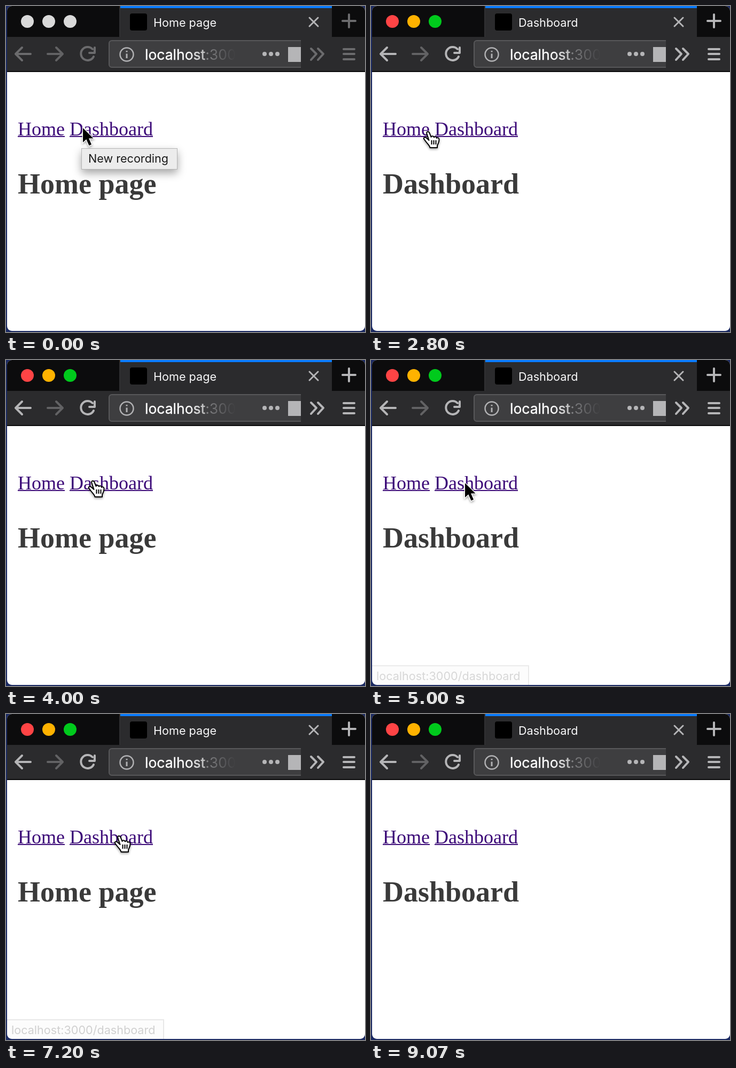
These frames come from a looping animation (672 by 612 pixels, 9140 ms). An HTML page:

```html
<!DOCTYPE html>
<html lang="en">
<head>
<meta charset="utf-8">
<title>Browser navigation</title>
<style>
  html, body { margin: 0; width: 100%; height: 100%; overflow: hidden; background: #1b2a63; }
  svg { display: block; width: 672px; height: 612px; }
  .ui { font-family: Inter, "Liberation Sans", sans-serif; font-size: 21.6px; }
  .page { font-family: "Liberation Serif", "Times New Roman", serif; }
  .line { fill: none; stroke-width: 4; stroke-linecap: round; stroke-linejoin: round; }
  .live { stroke: #b5b5b7; }
  .inactive .live { stroke: #6b6b6d; }
  .inactive .light { fill: #d9d9d9; stroke: none; }
</style>
</head>
<body>
<svg viewBox="0 0 672 612">
  <defs>
    <clipPath id="frame"><rect x="2" width="670" height="610" rx="9"/></clipPath>
    <clipPath id="bar"><rect x="190" y="60" width="362" height="60"/></clipPath>
    <linearGradient id="fade" gradientUnits="userSpaceOnUse" x1="340" x2="430">
      <stop stop-color="#fff"/><stop offset="1" stop-color="#fff" stop-opacity="0"/>
    </linearGradient>
    <mask id="urlMask"><rect x="250" y="64" width="190" height="52" fill="url(#fade)"/></mask>
    <filter id="shadow" x="-50%" y="-50%" width="200%" height="200%">
      <feDropShadow dx="0" dy="2" stdDeviation="2" flood-opacity=".4"/>
    </filter>
    <filter id="tipShadow" x="-30%" y="-50%" width="160%" height="260%">
      <feDropShadow dx="0" dy="7" stdDeviation="8" flood-opacity=".35"/>
    </filter>
  </defs>

  <rect width="672" height="612" fill="#1b2a63"/>
  <g id="win" class="ui" clip-path="url(#frame)">
    <rect width="672" height="612" fill="#fff"/>
    <rect width="672" height="124" fill="#0c0c0d"/>
    <rect x="212" width="2" height="58" fill="#303032"/>
    <path d="M214 0H610V58H672V122H0V58H214Z" fill="#2b2b2d"/>
    <rect x="214" width="396" height="4" fill="#0a7cff"/>

    <circle class="light" cx="40" cy="29" r="12" fill="#ff4445"/>
    <circle class="light" cx="80" cy="29" r="12" fill="#ffb200"/>
    <circle class="light" cx="120" cy="29" r="12" fill="#00ca1c"/>
    <rect x="232" y="14" width="32" height="32" rx="4" fill="#000"/>
    <text id="tab" x="276" y="39" fill="#f9f9fa"></text>

    <g class="line">
      <path d="M568 22L584 38M584 22L568 38" stroke="#b5b5b7" stroke-width="3"/>
      <path class="live" d="M630 28H654M642 16V40"/>
      <path class="live" d="M46 90H18M30 78L18 90L30 102"/>
      <path d="M78 90H106M94 78L106 90L94 102" stroke="#626264"/>
      <path class="live" d="M162 81A12.5 12.5 0 1 0 164 95M166 78V88H156"/>
      <path class="live" d="M571 80L581 90L571 101M584 80L594 90L584 101"/>
      <path class="live" d="M632 81H652M632 90H652M632 100H652"/>
    </g>

    <g clip-path="url(#bar)">
      <rect x="193" y="65" width="380" height="50" rx="5" fill="#3e3e40" stroke="#58585a" stroke-width="2"/>
      <rect x="528" y="77" width="28" height="28" fill="#b5b5b7"/>
    </g>
    <circle cx="226" cy="91" r="12.5" fill="none" stroke="#b1b1b3" stroke-width="2.5"/>
    <path d="M226 84V86.5M226 89.5V98" stroke="#b1b1b3" stroke-width="3"/>
    <text x="260" y="101" font-size="26.5" mask="url(#urlMask)" fill="#b1b1b3"><tspan fill="#fff" stroke="#fff" stroke-width=".4">localhost</tspan>:3000</text>
    <g fill="#b5b5b7">
      <circle cx="484" cy="90" r="4"/><circle cx="496" cy="90" r="4"/><circle cx="508" cy="90" r="4"/>
    </g>

    <g class="page">
      <g font-size="36" fill="#3c0a78">
        <text x="22" y="243">Home</text><text x="119" y="243">Dashboard</text>
        <path d="M22 245H110M119 245H275" stroke="#3c0a78" stroke-width="2"/>
      </g>
      <text id="heading" x="22" y="352" font-size="54" font-weight="700" fill="#3a3a3a"></text>
    </g>

    <g id="status">
      <path id="panel" fill="#f5f5f5" stroke="#bbb" stroke-width="2"/>
      <text id="address" x="10" y="601" fill="#777"></text>
    </g>
  </g>

  <g id="tip" class="ui">
    <rect x="141.5" y="267.5" width="179" height="39" fill="#ececec" stroke="#b4b4b4" filter="url(#tipShadow)"/>
    <text x="154" y="294" fill="#1a1a1a">New recording</text>
  </g>

  <g id="cursor" filter="url(#shadow)">
    <path id="arrow" d="M0 0V27L6.3 21.3L11.5 33L16 31L11 19.6H19.5Z" fill="#000" stroke="#fff" stroke-width="2.5" paint-order="stroke"/>
    <g id="hand" transform="translate(-8 -1)" stroke="#000" stroke-width="2" stroke-linejoin="round">
      <path fill="#fff" d="M11.5 18L7.5 6C6 1.5 11 .5 12.5 4.5L15.5 12C16 9.5 20 9.5 21 12.5C22 10.5 25.5 11 26 14C27 12.5 30.5 13 30.5 16.5C30.8 22 28 25 27 28V32H13.5C13 28 9 25 6.5 21.5L2 15.5C1 12.5 4.5 11.5 6.5 13.5Z"/>
      <path fill="none" d="M16.5 18V26M20.5 18V26M24.5 18V26"/>
    </g>
  </g>
</svg>

<script>
const LOOP = 9140, ACTIVE_AT = 1100;
const $ = id => document.getElementById(id);
const clamp = v => Math.max(0, Math.min(1, v));
const show = (id, on) => $(id).style.display = on ? "" : "none";

// Pointer stops: time, x, y
const stops = [
  [0, 144, 229], [900, 144, 229], [1400, 168, 231], [2450, 168, 231],
  [2800, 105, 235], [3000, 80, 231], [3650, 80, 231],
  [4000, 161, 226], [4200, 176, 231], [5250, 176, 231],
  [5650, 78, 230], [6600, 78, 230], [7050, 210, 228],
  [8300, 210, 228], [8900, 330, 640]
];

// Link visits: status shown from, click time, destination
const visits = [
  [1550, 2200, "Dashboard"], [3050, 3450, "Home page"], [4300, 4860, "Dashboard"],
  [5750, 6170, "Home page"], [7150, 7590, "Dashboard"]
];

function pointer(t) {
  const i = stops.findIndex(s => s[0] > t);
  if (i < 0) return [0, 900];
  const [t0, x0, y0] = stops[i - 1], [t1, x1, y1] = stops[i];
  const k = (t - t0) / (t1 - t0), e = k * k * (3 - 2 * k);
  return [x0 + (x1 - x0) * e, y0 + (y1 - y0) * e];
}

function draw(now) {
  const t = now % LOOP;
  const past = visits.filter(v => v[1] <= t).pop();
  const title = past ? past[2] : "Home page";
  $("tab").textContent = $("heading").textContent = title;
  $("win").classList.toggle("inactive", t < ACTIVE_AT);
  $("tip").style.opacity = clamp((650 - t) / 250);

  const visit = visits.find(v => t >= v[0] && t < v[1] + 200);
  show("status", visit);
  if (visit) {
    const dash = visit[2] === "Dashboard";
    $("address").textContent = dash ? "localhost:3000/dashboard" : "localhost:3000";
    $("panel").setAttribute("d", `M0 574H${dash ? 295 : 182}V614H0Z`);
    $("status").style.opacity = Math.min(clamp((t - visit[0]) / 150), clamp((visit[1] + 200 - t) / 200));
  }

  // A fresh page keeps the arrow until the pointer moves again
  const [x, y] = pointer(t);
  const onLink = y > 208 && y < 250 && (x > 22 && x < 110 || x > 119 && x < 275);
  const hand = onLink && t > ACTIVE_AT && !(past && t - past[1] < 260);
  show("hand", hand);
  show("arrow", !hand);
  $("cursor").setAttribute("transform", `translate(${x} ${y})`);
  requestAnimationFrame(draw);
}
requestAnimationFrame(draw);
</script>
</body>
</html>
```
